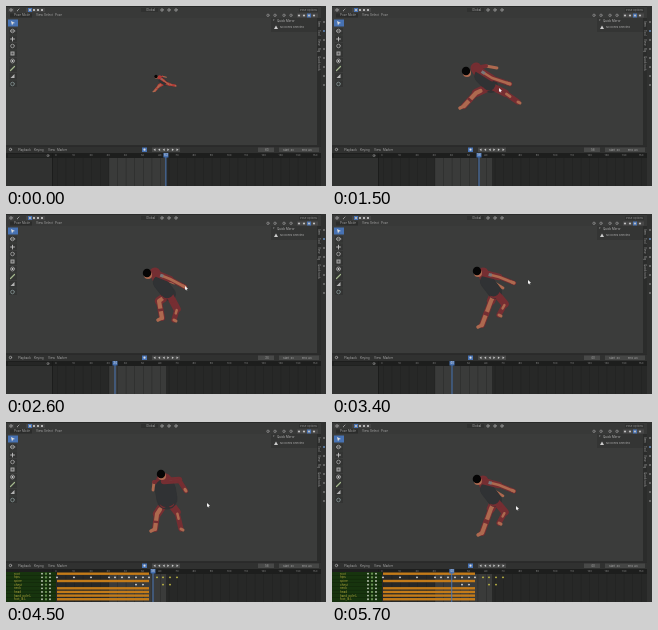
Animation of 320x180 px, one loop 5.8 s. Source, as an HTML page with a canvas:

```html
<!DOCTYPE html>
<html lang="en">
<head>
<meta charset="utf-8">
<title>Pose playback</title>
<style>
html, body { margin: 0; width: 100%; height: 100%; overflow: hidden; background: #3b3c3b; }
canvas { display: block; width: 100vw; height: 100vh; }
</style>
</head>
<body>
<canvas id="stage" width="320" height="180"></canvas>
<script>
const c = document.getElementById('stage').getContext('2d');
const LOOP = 5800, STEP = 100;
const START = 103, RANGE = 57;
const SKIN = '#ad694f', RED = '#752e32', CLOTH = '#303234';

const clamp = v => Math.max(0, Math.min(1, v));
const lerp = (a, b, k) => a + (b - a) * k;
const smooth = (a, b, t) => { const k = clamp((t - a) / (b - a)); return k * k * (3 - 2 * k); };
const mix = (p, q, k) => p.map((v, i) => lerp(v, q[i], k));

function box(x, y, w, h, fill) { c.fillStyle = fill; c.fillRect(x, y, w, h); }
function text(s, x, y, fill = '#a4a4a4', size = 3) {
  c.fillStyle = fill;
  c.font = size + 'px Inter, sans-serif';
  c.textBaseline = 'middle';
  c.fillText(s, x, y);
}
function line(points, color, width = 1, cap = 'round') {
  c.beginPath();
  points.forEach(p => c.lineTo(p[0], p[1]));
  c.strokeStyle = color;
  c.lineWidth = width;
  c.lineCap = cap;
  c.lineJoin = 'round';
  c.stroke();
}
function dot(x, y, r, fill, ry = r) {
  c.beginPath();
  c.ellipse(x, y, r, ry, 0, 0, 7);
  c.fillStyle = fill;
  c.fill();
}
function ring(x, y, r, color = '#b4b4b4') {
  c.beginPath();
  c.arc(x, y, r, 0, 7);
  c.strokeStyle = color;
  c.lineWidth = 0.7;
  c.stroke();
}
function shape(points, fill) {
  c.beginPath();
  points.forEach(p => c.lineTo(p[0], p[1]));
  c.closePath();
  c.fillStyle = fill;
  c.fill();
}
function diamond(x, y, fill) {
  shape([[x - 1.1, y], [x, y - 1.1], [x + 1.1, y], [x, y + 1.1]], fill);
}

// Joints: head, neck, hip, near elbow, near hand, far elbow, far hand,
// near knee, near foot, far knee, far foot.
const poses = {
  crouch: [141,59, 149,59, 163,80, 164,65, 179,73, 158,65, 168,69, 153,87, 156,104, 171,95, 168,106],
  step:   [145,57, 151,59, 163,78, 167,63, 182,69, 161,68, 171,74, 159,87, 150,111, 173,90, 167,101],
  reach:  [134,65, 144,62, 159,80, 160,72, 178,78, 154,60, 165,62, 144,87, 132,100, 173,87, 186,96],
  lunge:  [138,59, 147,62, 160,75, 158,70, 170,79, 154,59, 164,61, 146,82, 135,95, 172,79, 186,82],
  stand:  [155,52, 158,59, 161,77, 173,58, 180,69, 148,60, 147,68, 151,92, 149,107, 171,90, 175,107]
};

// Playhead distance travelled over time, wrapped to the playback range.
const travel = [[0, 56.9], [700, 97], [1500, 158], [2600, 234], [3400, 302], [4500, 386], [5800, 480]];
const pointer = [[0, 172, 82], [700, 209, 95], [1500, 167, 82], [2600, 179, 72],
                 [3400, 196, 66], [4500, 201, 81], [5700, 184, 84], [5800, 184, 84]];
function sample(track, t) {
  const i = Math.max(1, track.findIndex(p => p[0] >= t));
  const a = track[i - 1], b = track[i];
  return mix(a, b, (t - a[0]) / (b[0] - a[0])).slice(1);
}

function poseAt(phase, t) {
  const turn = smooth(3000, 4200, t);
  const end = mix(poses.lunge, poses.stand, turn);
  const keys = [[0, end], [6, poses.crouch], [17, poses.step],
                [44, mix(poses.reach, poses.stand, turn)], [RANGE, end]];
  const i = Math.max(1, keys.findIndex(k => k[0] >= phase));
  const [a, p] = keys[i - 1], [b, q] = keys[i];
  return mix(p, q, (phase - a) / (b - a));
}

function limb(a, b, d, upper, lower, width) {
  line([b, d], lower, width * 0.7);
  line([a, b], upper, width);
}

function figure(phase, t) {
  const p = poseAt(phase, t);
  const [head, neck, hip, elbow, hand, farElbow, farHand, knee, foot, farKnee, farFoot] =
    Array.from({ length: 11 }, (_, i) => [p[2 * i], p[2 * i + 1]]);
  const zoom = lerp(0.4, 1, smooth(900, 1350, t));
  const shade = zoom < 0.7 ? '#b33a36' : RED;
  const wide = smooth(3400, 4400, t) * clamp((phase - 17) / 27);
  const belly = mix(neck, hip, 0.45);
  belly[0] -= 1.5 * (1 - wide);
  c.save();
  c.translate(158, 78);
  c.scale(zoom, zoom);
  c.translate(-158, -78);
  limb(neck, farElbow, farHand, shade, SKIN, 4);
  limb(hip, farKnee, farFoot, shade, shade, 7.5);
  line([mix(farKnee, farFoot, 0.1), mix(farKnee, farFoot, 0.4)], SKIN, 2.5);
  line([farFoot, [farFoot[0] + 2, farFoot[1] + 1]], SKIN, 3);
  limb(hip, knee, foot, shade, shade, 8.5);
  line([mix(hip, knee, 0.7), knee, foot], SKIN, 4.2);
  line([mix(knee, foot, 0.45), mix(knee, foot, 0.6)], shade, 5, 'butt');
  line([foot, [foot[0] - 4, foot[1] + 2]], SKIN, 3.6);
  line([neck, belly], shade, 11 + 5 * wide);
  line([belly, hip], CLOTH, 14 + 7 * wide);
  line([mix(hip, knee, 0.35), hip, mix(hip, farKnee, 0.35)], shade, 7);
  line([belly, mix(belly, hip, 0.8)], CLOTH, 13 + 7 * wide);
  line([neck, elbow], shade, 6.5);
  line([elbow, hand], shade, 4.5);
  line([mix(neck, elbow, 0.5), elbow, hand], wide > 0.5 ? shade : SKIN, 2.6);
  line([mix(elbow, hand, 0.85), hand], SKIN, 3);
  line([mix(neck, elbow, 0.35), mix(neck, elbow, 0.55)], '#77787a', 3 * (1 - wide) + 0.1, 'butt');
  dot(head[0] + 1, head[1] + 2, 4, SKIN);
  dot(head[0], head[1], 4.2, '#050505', 4.3);
  c.restore();
}

function header() {
  box(0, 0, 320, 12, '#383938');
  box(0, 0, 320, 1, '#292a29');
  box(2, 2, 6, 4, '#414141');
  ring(5, 4, 1.2);
  line([[11, 5], [13, 3]], '#aaa', 0.8);
  box(20, 2, 19, 4, '#454545');
  box(22, 2, 4, 4, '#4772b3');
  for (let x = 24; x < 39; x += 4) box(x - 1, 3, 2, 2, '#b4b4b4');
  box(135, 2, 17, 4, '#303130');
  text('Global', 140, 4);
  for (const x of [156, 163, 170]) ring(x, 4, 1.2);
  box(293, 2, 19, 4, '#303130');
  text('Pose Options', 294, 4, '#999', 2.7);
  box(4, 7.5, 22, 4, '#2b2c2b');
  text('Pose Mode', 8, 9.5);
  text('View', 30, 9.5);
  text('Select', 38, 9.5);
  text('Pose', 49, 9.5);
  for (const x of [262, 269, 278, 285]) ring(x, 9.3, 1.2, '#999');
  box(291, 7.5, 21, 4, '#484848');
  box(301, 7.5, 4, 4, '#4772b3');
  for (const x of [293, 298, 303, 308]) dot(x, 9.5, 1.1, '#bfbfbf');
}

function toolbar() {
  box(2, 13.5, 10, 7, '#4772b3');
  shape([[5, 15], [9, 17], [7, 17.5], [6, 19.5]], '#ddd');
  for (let y = 25; y < 81; y += 7.5) box(3, y - 3, 8, 6.5, '#333433');
  ring(6.5, 25, 1.8);
  line([[4, 25], [9, 25]], '#bbb', 0.6);
  line([[4.5, 33], [8.5, 33]], '#ccc', 0.8);
  line([[6.5, 31], [6.5, 35]], '#ccc', 0.8);
  ring(6.5, 40, 1.8);
  box(4.5, 45.5, 4, 4, '#aaa');
  box(5.5, 46.5, 2, 2, '#555');
  ring(6.5, 55, 2);
  dot(6.5, 55, 1, '#ccc');
  line([[4.5, 64.5], [8.5, 60.5]], '#a4b88e', 1.2);
  shape([[4.5, 72], [8.5, 72], [8.5, 68]], '#b4b4b4');
  ring(6.5, 78, 1.8, '#8fa0a0');
}

function sidebar() {
  box(265, 12, 46, 14, '#343534');
  text('▾', 267, 14.5, '#999');
  text('Quick Mirror', 271, 14.7, '#b4b4b4');
  shape([[268, 23], [270, 19.5], [272, 23]], '#ccc');
  text('No bones selected', 274, 21.5, '#b0b0b0', 2.7);
  box(311, 12, 4, 128, '#2b2c2b');
  box(315, 0, 5, 180, '#303130');
  ['Item', 'Tool', 'View', 'Rig', 'Quick tools'].forEach((s, i) => {
    c.save();
    c.translate(313, [15, 24, 33, 42, 50][i]);
    c.rotate(Math.PI / 2);
    text(s, 0, 0, '#a4a4a4', 2.8);
    c.restore();
  });
  for (let y = 16; y < 86; y += 9) dot(318, y, 1, y === 25 ? '#638bbd' : '#777');
}

function timeline(x, keyed) {
  box(0, 140, 315, 7, '#303130');
  box(0, 139.5, 315, 0.8, '#1c1c1c');
  ring(4.5, 143.5, 1.2);
  text('Playback', 12, 143.6);
  text('Keying', 28, 143.6);
  text('View', 42, 143.6);
  text('Marker', 51, 143.6);
  box(136, 141.5, 5, 4.5, '#4772b3');
  dot(138.5, 143.7, 1.1, '#ddd');
  box(146, 141.5, 28, 4.5, '#464746');
  for (let i = 0; i < 6; i++) {
    const q = 148.5 + i * 4.6, d = i < 3 ? 1 : -1;
    shape([[q - d, 143.7], [q + d, 142.5], [q + d, 145]], '#ccc');
  }
  const count = String(Math.round((x - 51) / 1.72));
  box(252, 141.5, 16, 4.5, '#484948');
  text(count, 259, 143.7);
  box(273, 141.5, 40, 4.5, '#454645');
  text('Start  30', 277, 143.7, '#aaa', 2.7);
  text('End  63', 296, 143.7, '#aaa', 2.7);

  box(0, 147, 315, 33, '#272827');
  box(START, 152, RANGE, 28, '#3a3b3a');
  box(0, 147, 315, 5, '#1d1e1d');
  box(0, 152, 46, 28, '#303130');
  box(46, 147, 0.7, 33, '#191919');
  for (let i = 0; i < 31; i++) {
    const gx = 51 + i * 8.6;
    box(gx, 152, 0.6, 28, '#1e1f1e88');
    if (i % 2 === 0) text(String(i * 5), gx - 2, 149.5, '#858585', 2.7);
  }
  if (keyed) channels(); else {
    box(2, 148, 42, 3.5, '#252625');
    ring(42, 149.6, 1, '#888');
  }
  box(x - 0.5, 150, 1, 30, '#4a78b8');
  box(x - 2.5, 147, 5, 4.5, '#4772b3');
  text(count, x - 1.8, 149.4, '#ddd', 3);
}

function channels() {
  const names = ['root', 'hips', 'spine', 'chest', 'neck', 'head', 'hand_pole.L', 'foot_ik.L'];
  const first = [51, 68, 85, 103, 109, 116, 123, 130, 137, 143, 151, 157, 164, 171];
  const second = [130, 137, 157, 164];
  box(0, 150, 50, 30, '#17340e');
  names.forEach((name, i) => {
    const y = 151.7 + i * 3.65;
    box(0, y + 1.6, 50, 0.4, '#0d2008');
    text(name, 8, y, '#b0a53c', 3);
    dot(36, y, 0.9, '#c4cdbd');
    box(39, y - 1, 2, 2, '#658f50');
    dot(44, y, 0.9, '#c4cdbd');
    if (i === 1 || i === 3) {
      for (const x of i === 1 ? first : second) diamond(x, y, x > 147 ? '#c5be45' : '#dddddd');
    } else {
      box(51, y - 1.2, 92, 2.4, '#c37b19');
    }
  });
}

function cursor(t) {
  if (t < 100) return;
  const [x, y] = sample(pointer, t);
  shape([[x, y], [x, y + 4], [x + 1, y + 3.2], [x + 1.8, y + 4.6],
         [x + 2.4, y + 4.2], [x + 1.8, y + 2.9], [x + 3, y + 2.8]], '#f4f4f4');
}

function frame(now) {
  const t = Math.floor((now % LOOP) / STEP) * STEP;
  const phase = sample(travel, t)[0] % RANGE;
  box(0, 0, 320, 180, '#3b3c3b');
  figure(phase, t);
  header();
  toolbar();
  timeline(START + phase, t >= 4000);
  sidebar();
  cursor(t);
  requestAnimationFrame(() => frame(performance.now() - origin));
}
const origin = performance.now();
frame(0);
</script>
</body>
</html>
```
